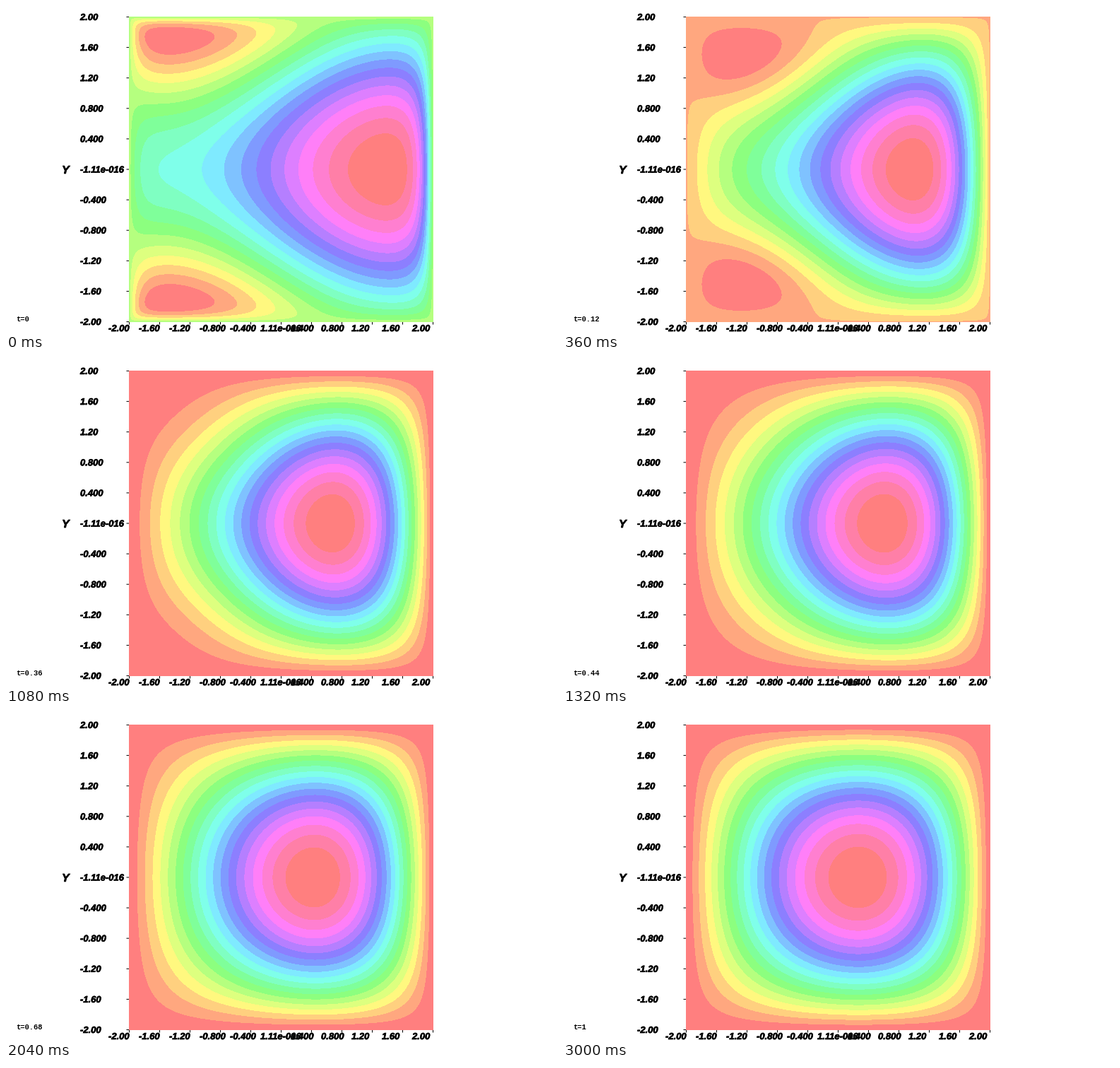
Recreate the animation shown at these times as a matplotlib script. Size 780x461 px, loop 3060 ms.

```python
import numpy as np
import matplotlib.pyplot as plt
import matplotlib.patheffects as pe
from matplotlib.animation import FuncAnimation
from matplotlib.colors import ListedColormap, hsv_to_rgb

W, H, DPI = 780, 461, 100
FRAMES, INTERVAL = 51, 60
LEFT, RIGHT, TOP, BOTTOM = 174, 604, 15, 446     # wall pixels
DT, BANDS, MODES = 0.02, 20, 140


def px(size):
    return size * 72 / DPI


# Heat equation on [-2, 2]^2 with u = 0 on the walls, implicit Euler in time.
# Start: u = sin(x) + 1.68 cos(y), expanded in sine modes.
m = np.arange(1, MODES + 1)


def basis(p):
    return np.sin(np.outer(p + 2, m) * np.pi / 4)


quad = (np.arange(8000) + 0.5) / 2000 - 2
weights = basis(quad) / 4000
one = weights.T @ np.ones_like(quad)
sin_c = weights.T @ np.sin(quad)
cos_c = weights.T @ np.cos(quad)
start = np.outer(one, sin_c) + 1.68 * np.outer(cos_c, one)
damp = 1 / (1 + DT * (np.pi / 4) ** 2 * (m[:, None] ** 2 + m[None, :] ** 2))
cols = basis(np.linspace(-2, 2, RIGHT - LEFT + 1))
rows = basis(np.linspace(-2, 2, BOTTOM - TOP + 1))


def field(k):
    u = rows @ (start * damp ** (k + 1)) @ cols.T
    low, high = u.min(), u.max()
    v = (u - low) / (high - low)
    return np.clip(np.floor(v * BANDS), 0, BANDS - 1)


hues = np.arange(BANDS) / (BANDS - 1) % 1
palette = ListedColormap([hsv_to_rgb((h, 0.5, 1)) for h in hues])

fig = plt.figure(figsize=(W / DPI, H / DPI), dpi=DPI, facecolor="white")
image = fig.figimage(field(0), xo=LEFT, yo=H - BOTTOM - 1, cmap=palette,
                     vmin=-0.5, vmax=BANDS - 0.5, origin="upper")
ax = fig.add_axes([0, 0, 1, 1])
ax.axis("off")
ax.set_xlim(0, W)
ax.set_ylim(H, 0)


def line(xs, ys, color):
    ax.plot(xs, ys, color=color, lw=px(1), zorder=2,
            solid_capstyle="butt", snap=False)


def label(x, y, text, size=13):
    ax.text(x, y, text, family="Liberation Sans", weight="bold",
            style="italic", size=px(size), color="black", zorder=3,
            path_effects=[pe.withStroke(linewidth=px(0.7),
                                        foreground="black")])


x0, x1, y0, y1 = LEFT + 0.5, RIGHT + 0.5, TOP + 0.5, BOTTOM + 0.5
AXIS, OUTLINE = "#2a6464", "#84d4d4"
line([x0, x1], [y0, y0], OUTLINE)
line([x1, x1], [y0, y1], OUTLINE)
line([x0 + 1, x0 + 1], [y0, y1], OUTLINE)
line([x0, x0], [y0, y1], AXIS)
line([x0, x1], [y1, y1], AXIS)


def tick_text(i):
    value = (i - 5) * 0.4
    if i == 5:
        return "1.11e-016"
    return f"{value:.3f}" if abs(value) < 1 else f"{value:.2f}"


for i in range(11):
    tx = x0 + i * (x1 - x0) / 10
    ty = y1 - i * (y1 - y0) / 10
    line([tx, tx], [y1, y1 + 4], "black")
    line([x0 - 4, x0], [ty, ty], "black")
    label(tx - 29.5, 460, tick_text(i))
    label(105, ty + 4.5, ("-" if i == 5 else "") + tick_text(i))
label(79, 237, "Y", 16)

clock = ax.text(14, 446, "t=0", family="Liberation Mono", weight="bold",
                size=px(10.5), color="black", zorder=3)


def update(k):
    image.set_data(field(k))
    clock.set_text(f"t={k * DT:g}")
    return image, clock


anim = FuncAnimation(fig, update, frames=FRAMES, interval=INTERVAL,
                     repeat=True, repeat_delay=0, blit=False)
plt.show()
```
